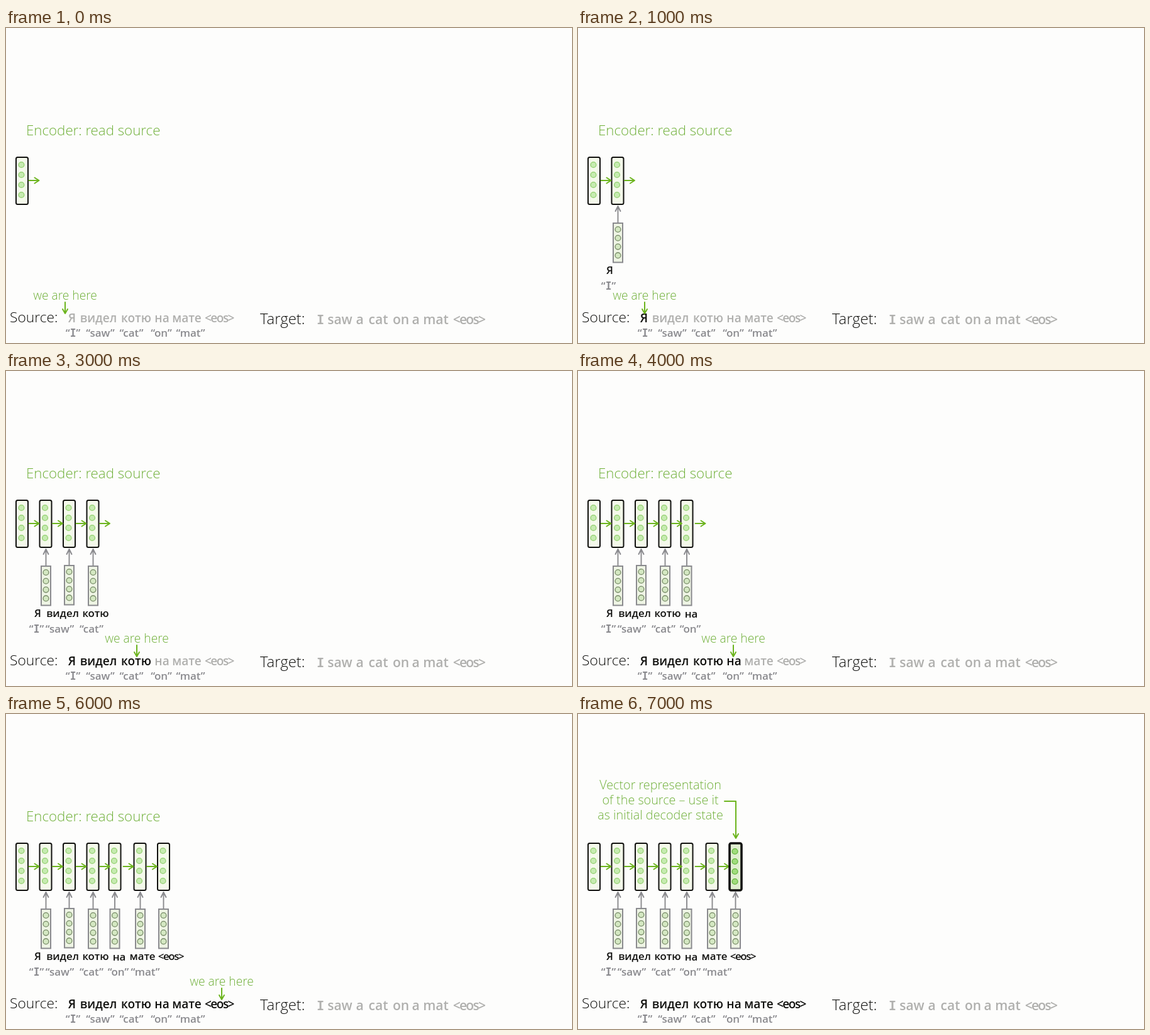
Animation, 900 px wide and 502 px high, one loop 8 s. Source, as an HTML page:

```html
<!DOCTYPE html>
<html lang="en">
<head>
<meta charset="utf-8">
<title>Encoder reading a sentence</title>
<style>
  html, body { margin: 0; width: 100%; height: 100%; overflow: hidden; background: #fdfdfc; }
  svg { display: block; width: 900px; height: 502px; }
  text { font-family: "Open Sans", "Noto Sans", sans-serif; }
  .label { font-weight: 350; }
  .word { font-weight: 600; text-anchor: middle; }
  .tag { letter-spacing: -0.08em; }
  .serif-i { font-family: "Noto Sans Mono", monospace; }
</style>
</head>
<body>
<svg id="stage" viewBox="0 0 900 502"></svg>
<script>
const GREEN = '#70b03a', ARROW = '#6cb41e', INK = '#11110f', GRAY = '#8a8a8e', PALE = '#b0b0ae';
const STEP_MS = 1000, STEPS = 8, LAST = STEPS - 1;
const stage = document.getElementById('stage');

function add(parent, tag, attrs, content) {
  const el = document.createElementNS('http://www.w3.org/2000/svg', tag);
  for (const key in attrs) el.setAttribute(key, attrs[key]);
  if (content) el.textContent = content;
  parent.append(el);
  return el;
}
const group = () => add(stage, 'g', {});

function label(parent, x, y, size, content, fill = GREEN, anchor = 'start') {
  return add(parent, 'text',
    { x, y, fill, class: 'label', 'font-size': size, 'text-anchor': anchor }, content);
}

function word(parent, x, y, size, content, fill) {
  const style = content === 'I' ? 'serif-i' : content[0] === '<' ? 'tag' : '';
  return add(parent, 'text', { x, y, fill, class: 'word ' + style, 'font-size': size }, content);
}

// Quoted gloss; the pronoun needs a barred capital.
function gloss(parent, x, y, content) {
  const el = word(parent, x, y, 17, '“', GRAY);
  add(el, 'tspan', content === 'I' ? { class: 'serif-i' } : {}, content);
  add(el, 'tspan', {}, '”');
}

function line(parent, d, stroke, width = 2) {
  add(parent, 'path', { d, stroke, fill: 'none', 'stroke-width': width,
    'stroke-linecap': 'round', 'stroke-linejoin': 'round' });
}

function rightArrow(parent, x) {
  line(parent, `M${x} 243h16m-7 -4.5l7 4.5l-7 4.5`, ARROW);
}

function dots(parent, x, y, gap, fill, stroke) {
  for (let i = 0; i < 4; i++)
    add(parent, 'circle', { cx: x, cy: y + i * gap, r: 4.4, fill, stroke, 'stroke-width': 1.3 });
}

function state(parent, x, final) {
  add(parent, 'rect', { x, y: 206, width: 19, height: 75, rx: 2.5, stroke: INK,
    fill: final ? '#e0eed0' : '#f4f9ea', 'stroke-width': final ? 3.6 : 2 });
  dots(parent, x + 8.5, final ? 219 : 218, 16,
    final ? '#a0dc7c' : '#c6ebb0', final ? '#62b53c' : '#93d070');
}

function embedding(parent, x, y) {
  line(parent, `M${x} ${y}V284m-4 8l4 -8l4 8`, GRAY, 1.9);
  add(parent, 'rect', { x: x - 7.5, y, width: 15, height: 62.5,
    fill: '#eef4e4', stroke: GRAY, 'stroke-width': 2 });
  dots(parent, x, y + 10, 13.8, '#d4e8c2', '#768a66');
}

// text, gloss, state x, embedding x, upper text x, upper gloss x, lower text x, lower gloss x
const tokens = [
  ['Я', 'I', 53.5, 63.5, 50.5, 48.5, 105, 106.5],
  ['видел', 'saw', 91, 100.5, 90, 85.5, 147, 150],
  ['котю', 'cat', 128.5, 138.5, 142.5, 136, 207, 199.5],
  ['на', 'on', 163.5, 173, 180, 178.5, 248, 247],
  ['мате', 'mat', 203.5, 213.5, 217, 221.5, 287.5, 293.5],
  ['<eos>', '', 241, 250.5, 262, 0, 339, 0]
];
const pointerX = [94, 106, 153, 208, 247, 284, 343];

// Captions
const title = label(stage, 32, 171, 22.3, 'Encoder: read source');
label(stage, 6, 469, 22.8, 'Source:', INK);
label(stage, 404, 472, 23.8, 'Target:', INK);

const target = [['I', 500], ['saw', 531], ['a', 562.5], ['cat', 592], ['on', 628],
  ['a', 651.5], ['mat', 683.5], ['<eos>', 736]];
for (const [content, x] of target) word(stage, x, 472, 21, content, PALE);

// Encoder
state(stage, 16);
const columns = tokens.map(([text, mean, stateX, embedX, upX, upGlossX, lowX, lowGlossX], i) => {
  const column = group();
  state(column, stateX);
  embedding(column, embedX, i === 1 ? 310 : 311);
  word(column, upX, i === 3 ? 393 : 392, 16.8, text, INK);
  if (mean) {
    gloss(column, upGlossX, 417, mean);
    gloss(stage, lowGlossX, 492, mean);
  }
  const source = word(stage, lowX, 469, 19, text, PALE);
  return { column, source };
});
const arrows = tokens.map((_, i) => {
  const arrow = group();
  rightArrow(arrow, 36.5 + 37.5 * i);
  return arrow;
});

// Reading position
const pointer = group();
label(pointer, 0, 433, 19.2, 'we are here', GREEN, 'middle');
line(pointer, 'M0 437V455m-4 -7l4 7l4 -7', ARROW);

// Closing note
const note = group();
['Vector representation', 'of the source – use it', 'as initial decoder state'].forEach((content, i) =>
  label(note, 131, 120 + 24 * i, 19.8, content, GREEN, 'middle'));
line(note, 'M233 139H251V198m-4 -7l4 7l4 -7', ARROW);
state(note, 241, true);

const show = (el, on) => el.setAttribute('visibility', on ? 'visible' : 'hidden');

function render(step) {
  const done = step === LAST;
  columns.forEach(({ column, source }, i) => {
    const read = step > i;
    show(column, read);
    source.setAttribute('fill', read ? INK : PALE);
  });
  arrows.forEach((arrow, i) => show(arrow, step >= i));
  show(title, !done);
  show(note, done);
  show(pointer, !done);
  if (!done) pointer.setAttribute('transform', `translate(${pointerX[step]} 0)`);
}

const start = performance.now();
let current = -1;
function tick(now) {
  const step = Math.floor(Math.max(0, now - start) / STEP_MS) % STEPS;
  if (step !== current) render(current = step);
  requestAnimationFrame(tick);
}
tick(start);
</script>
</body>
</html>
```
